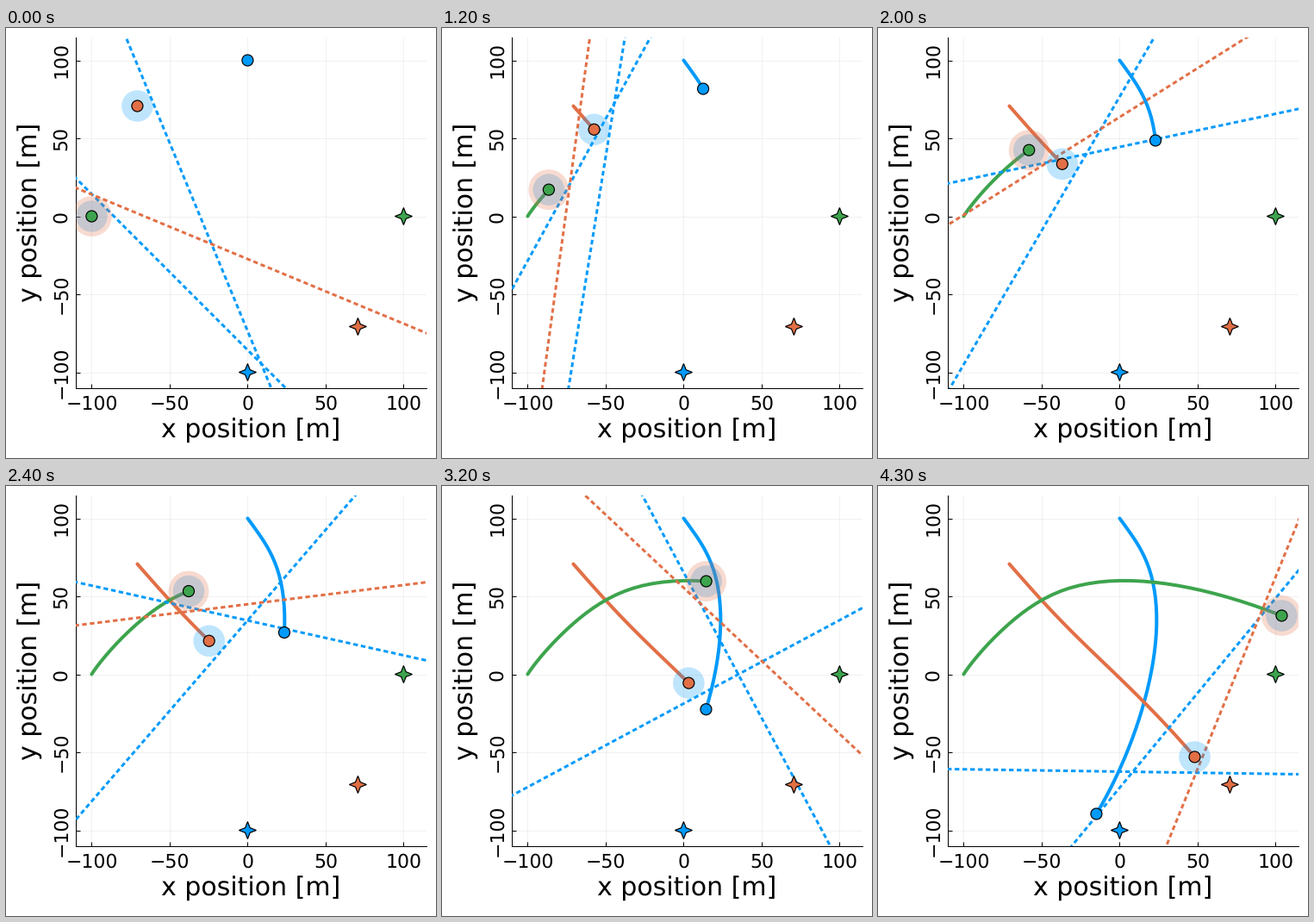
Recreate the animation shown at these times as a matplotlib script. Size 499 px wide and 499 px high, loop 4400 ms.

```python
import numpy as np
import matplotlib.pyplot as plt
from matplotlib.animation import FuncAnimation
from matplotlib.patches import Circle

SIZE, DPI, FRAMES = 499, 100, 44
COLORS = ("#009afa", "#e26f46", "#3da44d")
PX = 72 / DPI                       # one pixel in points
SCALE, CX, CY = 1.81, 280.4, 218.5  # pixels per metre, place of the origin
LEFT, RIGHT, TOP, BOTTOM = 81, 488, 11, 418
EDGE = dict(ec="black", lw=1.2 * PX)

plt.rcParams.update({"font.family": "DejaVu Sans", "text.hinting": "none",
                     "text.hinting_factor": 1})

# Positions are complex numbers in metres; goals lie opposite the starts.
STARTS = 100 * np.exp(1j * np.pi * np.array([1 / 2, 3 / 4, 1]))
KEY_TIMES = np.array([0.8, 1.6, 2.4, 3.7, 4.3])
KEYS = (
    (5.8 + 92j, 19.1 + 67.2j, 23.5 + 26.8j, 3 - 54.1j, -14.9 - 89.5j),
    (-64.9 + 64.1j, -47.7 + 45j, -24.7 + 21.4j, 22.9 - 25.3j, 48.1 - 53j),
    (-94.6 + 7.5j, -74.3 + 29.3j, -37.8 + 53.3j, 53.3 + 53.6j, 103.9 + 37.6j),
)


def basis(t):
    """Cubic spline terms for a start from rest."""
    bends = [np.clip(t - k, 0, None)**3 for k in KEY_TIMES[:3]]
    return np.stack([t**2, t**3] + bends, axis=1)


def path(start, keys):
    coef = np.linalg.solve(basis(KEY_TIMES), np.array(keys) - start)
    return start + basis(np.arange(FRAMES) / 10) @ coef


PATHS = [path(s, k) for s, k in zip(STARTS, KEYS)]

# Rotating planes: owner, obstacle, radius, degrees per frame
PLANES = ((0, 1, 10.1, -2.636), (0, 2, 10.1, -6.15), (1, 2, 12.95, -6.27))

fig = plt.figure(figsize=(SIZE / DPI, SIZE / DPI), dpi=DPI, facecolor="white")
ax = fig.add_axes([LEFT / SIZE, 1 - BOTTOM / SIZE,
                   (RIGHT - LEFT) / SIZE, (BOTTOM - TOP) / SIZE])
ax.set_xlim((LEFT - CX) / SCALE, (RIGHT - CX) / SCALE)
ax.set_ylim((CY - BOTTOM) / SCALE, (CY - TOP) / SCALE)
ticks = np.arange(-100, 101, 50)
ax.set_xticks(ticks)
ax.set_yticks(ticks)
ax.tick_params(direction="in", length=5 * PX, width=PX,
               labelbottom=False, labelleft=False)
ax.grid(color="black", alpha=0.07, lw=0.8 * PX)
ax.set_axisbelow(True)
for side, spine in ax.spines.items():
    spine.set_visible(side in ("left", "bottom"))
    spine.set_linewidth(PX)


def label(x, y, text, size, angle=0):
    fig.text(x / SIZE, 1 - y / SIZE, text, fontsize=size * PX, rotation=angle,
             rotation_mode="anchor", ha="center", va="baseline")


for v in ticks:
    name = str(v).replace("-", "\u2212")
    label(CX + v * SCALE, 442.3, name, 21.6)
    label(70, CY - v * SCALE, name, 21.6, 90)
label(284.6, 476, "x position [m]", 29.6)
label(36.5, 213.8, "y position [m]", 29.6, 90)


def circle(radius, color, z, **style):
    disc = Circle((0, 0), radius, fc=color, zorder=z, snap=False, **style)
    return ax.add_patch(disc)


trails, dots, planes, discs = [], [], [], []
corner = np.arange(8)
star = np.where(corner % 2, 4, 10) / SCALE * np.exp(1j * np.pi / 4 * corner)
for start, color in zip(STARTS, COLORS):
    trails.append(ax.plot([], [], color=color, lw=4 * PX, zorder=3,
                          solid_capstyle="round", solid_joinstyle="round")[0])
    dots.append(circle(6.5 / SCALE, color, 6, **EDGE))
    outline = star - start
    ax.fill(outline.real, outline.imag, fc=color, zorder=5.5, **EDGE)
for owner, _, radius, _ in PLANES:
    planes.append(ax.plot([], [], color=COLORS[owner], lw=3 * PX, zorder=3.5,
                          dashes=(1.8, 1.2), dash_capstyle="butt")[0])
    discs.append(circle(radius, COLORS[owner], 4, alpha=0.25, lw=0))


def put(line, points):
    line.set_data(points.real, points.imag)


def move(disc, point):
    disc.set_center((point.real, point.imag))


def draw(i):
    for trail, dot, track in zip(trails, dots, PATHS):
        put(trail, track[:i + 1] if i else track[:0])
        move(dot, track[i])
    for line, disc, (owner, other, radius, rate) in zip(planes, discs, PLANES):
        # Each normal starts out pointing from the obstacle to the owner.
        angle = np.angle(STARTS[owner] - STARTS[other]) + np.radians(rate * i)
        normal = np.exp(1j * angle)
        center = PATHS[other][i]
        put(line, center + normal * (radius + 400j * np.array([-1, 1])))
        move(disc, center)
    return trails + planes + discs + dots


anim = FuncAnimation(fig, draw, frames=FRAMES, interval=100, repeat=True,
                     repeat_delay=0, init_func=lambda: draw(0))
plt.show()
```
